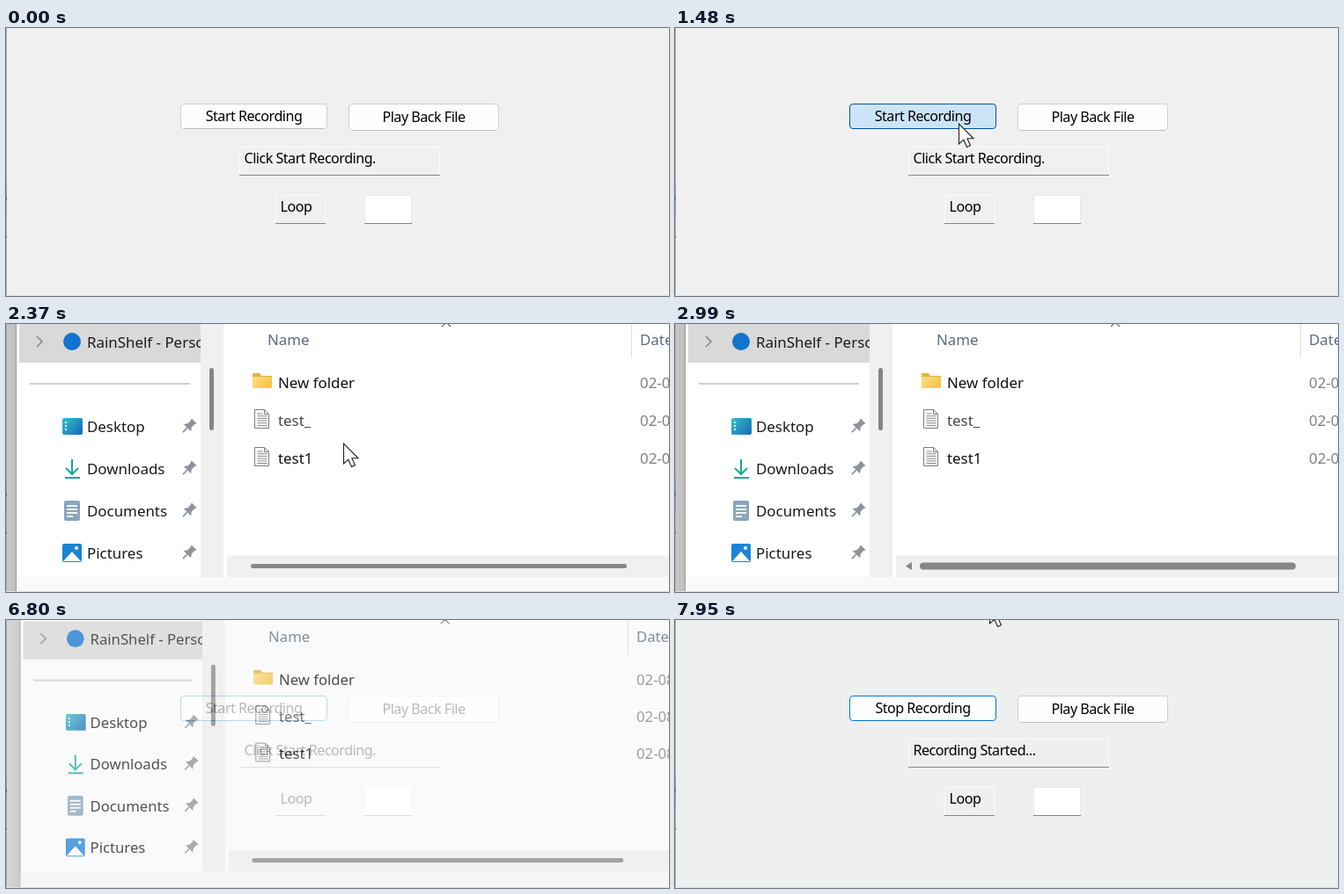
An HTML page with a canvas for the animation above (8 s loop, 753 px wide and 305 px high).

```html
<!DOCTYPE html>
<html lang="en">
<head>
<meta charset="utf-8">
<title>Recorder</title>
<style>
  html, body { margin: 0; width: 100%; height: 100%; overflow: hidden; background: #f0f0f0; }
  canvas { display: block; }
</style>
</head>
<body>
<canvas id="stage" width="753" height="305"></canvas>
<script>
const W = 753, H = 305, LOOP = 8000, STEP = 68, FIRST = 520;
const FONT = '"Noto Sans", "Open Sans", sans-serif';
const stage = document.getElementById('stage').getContext('2d');
const layer = document.createElement('canvas');
layer.width = W;
layer.height = H;
const dialogCtx = layer.getContext('2d');

// Tracks: [time, values...], linear between entries
const CURSOR_RUNS = [
  [[520, 490, 256], [860, 425, 196], [1130, 340, 121], [1268, 322, 109],
   [2152, 322, 109], [2356, 383, 136], [2560, 425, 252], [2832, 450, 310]],
  [[7250, 568, 272], [7600, 455, 118], [7932, 357, -19]]
];
// time, opacity, scale
const OPENING = [[1812, .35, .9], [1880, .85, .932], [1948, 1, .957], [2016, 1, .976], [2084, 1, .99], [2152, 1, 1]];
const CLOSING = [[6775, 1, 1], [6776, .73, .988], [6844, .25, .965], [6912, 0, .95]];
const CENTER = [390, 115];
const HOVER_BAR = [[2560, 0], [2696, 1], [3180, 1], [3730, 0]];

function sample(track, t) {
  if (t <= track[0][0]) return track[0].slice(1);
  for (let i = 1; i < track.length; i++) {
    const a = track[i - 1], b = track[i];
    if (t <= b[0]) {
      const k = (t - a[0]) / (b[0] - a[0]);
      return a.slice(1).map((v, j) => v + (b[j + 1] - v) * k);
    }
  }
  return track[track.length - 1].slice(1);
}

function cursorAt(t) {
  const run = CURSOR_RUNS.find(r => t >= r[0][0] && t <= r[r.length - 1][0]);
  return run && sample(run, t);
}

function rect(c, x, y, w, h, fill) {
  c.fillStyle = fill;
  c.fillRect(x, y, w, h);
}

function round(c, x, y, w, h, r, fill, line) {
  c.beginPath();
  c.roundRect(x, y, w, h, r);
  if (fill) { c.fillStyle = fill; c.fill(); }
  if (line) { c.strokeStyle = line; c.lineWidth = 1; c.stroke(); }
}

function path(c, pts, fill, line, width = 1, closed = true) {
  c.beginPath();
  pts.forEach(([x, y]) => c.lineTo(x, y));
  if (closed) c.closePath();
  if (fill) { c.fillStyle = fill; c.fill(); }
  if (line) { c.strokeStyle = line; c.lineWidth = width; c.stroke(); }
}

function disc(c, x, y, r, fill) {
  c.beginPath();
  c.arc(x, y, r, 0, Math.PI * 2);
  c.fillStyle = fill;
  c.fill();
}

function text(c, str, x, y, size, color = '#000', align = 'left') {
  c.font = size + 'px ' + FONT;
  c.textAlign = align;
  c.fillStyle = color;
  c.fillText(str, x, y);
}

// The recorder window uses a tall, tightly set face
function label(c, str, x, y, align) {
  c.letterSpacing = '-0.5px';
  text(c, str, x, y, 16.1, '#000', align);
  c.letterSpacing = '0px';
}

const LOOKS = {
  normal: ['#fdfdfd', '#d0d0d0'],
  hover: ['#e0eef9', '#0078d4'],
  pressed: ['#cce4f7', '#005499'],
  focus: ['#fdfdfd', '#0078d4']
};

function button(c, x, y, w, h, str, look) {
  const [fill, line] = LOOKS[look];
  round(c, x + .5, y + .5, w - 1, h - 1, 3.5, fill, line);
  if (look === 'normal') rect(c, x + 4, y + h - 1, w - 8, 1, '#bdbdbd');
  label(c, str, x + w / 2, Math.floor(y + h / 2) + 6, 'center');
}

function field(c, x, y, w, h, str, fill) {
  if (fill) rect(c, x, y, w, h, fill);
  c.strokeStyle = fill ? '#e9e9e9' : '#fafafa';
  c.lineWidth = 1;
  c.strokeRect(x + .5, y + .5, w - 1, h - 1);
  rect(c, x, y + h - 1, w, 1, '#868686');
  label(c, str, x + 5.5, y + 19);
}

function startLook(t) {
  if (t >= 1670) return t < 6700 ? 'hover' : 'focus';
  if (t >= 1400) return 'pressed';
  return t >= 1200 ? 'hover' : 'normal';
}

function drawMain(c, t, cur) {
  const started = t >= 6900;
  const overPlay = cur && cur[0] > 389 && cur[0] < 560 && cur[1] > 86 && cur[1] < 117;
  rect(c, 0, 0, W, H, started ? '#eeefef' : '#f0f0f0');
  button(c, 198, 86, 167, 29, started ? 'Stop Recording' : 'Start Recording', startLook(t));
  button(c, 389, 86, 171, 31, 'Play Back File', overPlay ? 'hover' : 'normal');
  field(c, 265, 135, 228, 33, started ? 'Recording Started...' : 'Click Start Recording.');
  field(c, 306, 190, 57, 33, 'Loop');
  field(c, 407, 190, 54, 33, '', '#fff');
}

function pin(c, x, y) {
  c.save();
  c.translate(x, y);
  c.rotate(Math.PI / 4);
  path(c, [[-4, -8], [4, -8], [3, -5], [3, -1], [6, 3], [-6, 3], [-3, -1], [-3, -5]], '#8c939b');
  rect(c, -.8, 3, 1.6, 7, '#8c939b');
  c.restore();
}

function folder(c, x, y) {
  path(c, [[x, y], [x + 8, y], [x + 10, y + 3], [x + 22, y + 3], [x + 22, y + 16], [x, y + 16]], '#e9b23c');
  const g = c.createLinearGradient(x, y, x + 22, y + 17);
  g.addColorStop(0, '#ffe08a');
  g.addColorStop(1, '#f6c23e');
  round(c, x, y + 4, 22, 13, 1.5, g);
}

function sheet(c, x, y, lined) {
  path(c, [[x, y], [x + 11, y], [x + 16, y + 5], [x + 16, y + 21], [x, y + 21]], '#fbfbfb', '#7d7d7d');
  path(c, [[x + 11, y], [x + 11, y + 5], [x + 16, y + 5]], null, '#7d7d7d', 1, false);
  if (lined) for (let i = 0; i < 6; i++) rect(c, x + 3, y + 4 + i * 2.7, i < 1 ? 6 : 11, 1, '#8a8a8a');
}

const ICONS = {
  Desktop(c, y) {
    const g = c.createLinearGradient(64, y - 10, 87, y + 9);
    g.addColorStop(0, '#35c0cf');
    g.addColorStop(1, '#1668b8');
    round(c, 64, y - 10, 23, 19, 2, g);
    for (let i = 0; i < 3; i++) rect(c, 67, y - 6 + i * 4, 2, 2, '#d8f4fa');
  },
  Downloads(c, y) {
    path(c, [[75, y - 11], [75, y + 6]], null, '#18a999', 2, false);
    path(c, [[68, y - 1], [75, y + 6], [82, y - 1]], null, '#18a999', 2, false);
    rect(c, 67, y + 9, 17, 2, '#18a999');
  },
  Documents(c, y) {
    round(c, 66, y - 12, 18, 23, 2, '#8aa5bd');
    for (let i = 0; i < 3; i++) rect(c, 69, y - 7 + i * 4, 12, 2, '#f2f7fb');
    rect(c, 69, y + 5, 7, 2, '#f2f7fb');
  },
  Pictures(c, y) {
    round(c, 64, y - 11, 22, 21, 2, '#1b83d6');
    path(c, [[65, y + 9], [75, y - 2], [85, y + 9]], '#fff');
    disc(c, 80, y - 6, 2, '#fff');
  }
};

function drawNav(c) {
  rect(c, 15, 0, 206, 44, '#d9d9d9');
  path(c, [[35, 14], [41, 20], [35, 26]], null, '#868686', 1.5, false);
  disc(c, 75, 20, 10, '#1274cf');
  c.save();
  c.beginPath();
  c.rect(12, -10, 209, 60);
  c.clip();
  text(c, 'RainShelf - Personal', 92, 27, 16.9, '#1a1a1a');
  c.restore();
  rect(c, 27, 67, 182, 2, '#d0d0d0');
  Object.keys(ICONS).forEach((name, i) => {
    const y = 117 + i * 48;
    ICONS[name](c, y);
    text(c, name, 92, y + 6, 16.9, '#1a1a1a');
    pin(c, 208, y - 1);
  });
  rect(c, 221, -10, 26, 298, '#f0f0f0');
  round(c, 231, 50, 5, 71, 2.5, '#858585');
}

function drawFiles(c, t) {
  text(c, 'Name', 297, 24, 16.9, '#5b6b7d');
  text(c, 'Date modified', 720, 24, 16.9, '#5b6b7d');
  rect(c, 710, -10, 1, 48, '#dedede');
  path(c, [[495, 3], [500, -2], [505, 3]], null, '#6a6a6a', 1.2, false);
  if (t < 2160) rect(c, 272, 90, 600, 36.5, '#e5f3ff');
  ['New folder', 'test_', 'test1'].forEach((name, i) => {
    const y = 67 + i * 43;
    if (i) sheet(c, 282.5, y - 12.5, t >= 2150);
    else folder(c, 280, y - 11);
    text(c, name, 309, y + 6, 16.9, i === 1 && t > 2160 ? '#484848' : '#111');
    text(c, '02-08-2022 12:10', 720, y + 6, 16.9, '#808080');
  });
}

function drawScroll(c, t) {
  const [k] = sample(HOVER_BAR, t);
  rect(c, 251, 263.5, 600, 24.5, '#f0f0f0');
  const h = 5 + 3 * k;
  round(c, 278, 275.5 - h / 2, 427, h, h / 2, '#868686');
  if (k > 0) {
    c.globalAlpha = k;
    path(c, [[262, 275.5], [269, 271], [269, 280]], '#868686');
    c.globalAlpha = 1;
  }
}

function drawDialog(t) {
  const [alpha, scale] = sample(t < 4000 ? OPENING : CLOSING, t);
  if (t < OPENING[0][0] || alpha <= 0) return;
  const c = dialogCtx, [cx, cy] = CENTER;
  c.setTransform(1, 0, 0, 1, 0, 0);
  c.clearRect(0, 0, W, H);
  c.translate(cx, cy);
  c.scale(scale, scale);
  c.translate(-cx, -cy);
  const shade = c.createLinearGradient(-32, 0, 12, 0);
  shade.addColorStop(0, 'rgba(0,0,0,.02)');
  shade.addColorStop(1, 'rgba(0,0,0,.21)');
  rect(c, -60, -40, 72, 400, shade);
  rect(c, 12, -40, 860, 400, '#fff');
  rect(c, 11, -40, 1, 400, '#999');
  if (t >= 2080) drawNav(c);
  drawFiles(c, t);
  rect(c, 12, 288, 860, 60, t >= 2080 ? '#f9f9f9' : '#fff');
  drawScroll(c, t);
  stage.globalAlpha = alpha;
  stage.drawImage(layer, 0, 0);
  stage.globalAlpha = 1;
}

function drawCursor(c, x, y) {
  const arrow = [[0, 0], [0, 23], [5.3, 18.2], [9, 26.5], [13, 24.8], [9.4, 16.8], [16.5, 16.8]];
  path(c, arrow.map(([dx, dy]) => [x + dx + .5, y + dy]), '#fff', '#222', 1.1);
}

function drawEdges(c) {
  rect(c, 0, 0, 1, H, '#a6a6a6');
  rect(c, 0, 177, 1, 36, '#9099a3');
  rect(c, 0, 193, 1, 2, '#1f4f8f');
  rect(c, 0, 237, 1, 1, '#333');
  rect(c, 0, H - 1, W, 1, '#dcdcdc');
}

function frame(now) {
  const t = FIRST + Math.floor((now % LOOP - FIRST) / STEP) * STEP;
  const cur = cursorAt(t);
  drawMain(stage, t, cur);
  drawDialog(t);
  if (cur) drawCursor(stage, cur[0], cur[1]);
  drawEdges(stage);
  requestAnimationFrame(frame);
}

requestAnimationFrame(frame);
</script>
</body>
</html>
```
